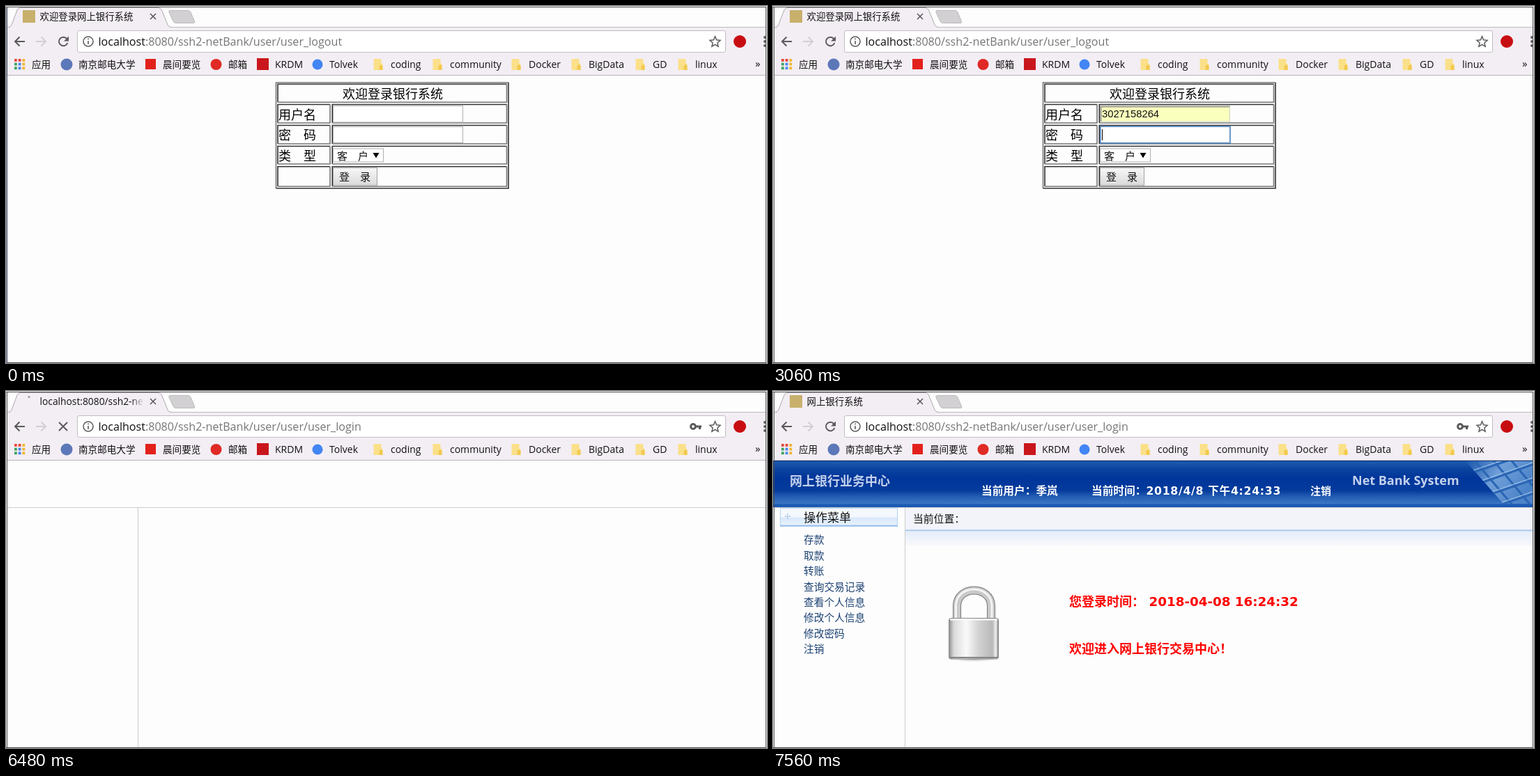
Animation, 1092 px wide and 513 px high, one loop 8000 ms. Source, as an HTML page:

```html
<!DOCTYPE html>
<html lang="zh-CN">
<head>
<meta charset="utf-8">
<title>网上银行系统</title>
<style>
  html, body { margin: 0; width: 100%; height: 100%; overflow: hidden; background: #fdfdfd; }
  svg { display: block; width: 100vw; height: 100vh; }
  text { font-family: "Open Sans", "Noto Sans CJK SC", "Noto Sans CJK", sans-serif; fill: #111; white-space: pre; }
  .tab { font-size: 13.4px; }
  .url { font-size: 16.1px; fill: #757575; }
  .url tspan { fill: #111; }
  .mark { font-size: 13.6px; }
  .cell { font-size: 18px; fill: #000; }
  .field { font: 14.75px "Liberation Sans", sans-serif; }
  .control { font-size: 15px; }
  .option { font-size: 14.5px; font-weight: 700; }
  .menu { font-size: 14.7px; fill: #1c4272; }
  .notice { font: 700 18px "DejaVu Sans", "Noto Sans CJK SC", "Noto Sans CJK", sans-serif; fill: #f00; }
  .bar { font: 700 15.7px "DejaVu Sans", "Noto Sans CJK SC", "Noto Sans CJK", sans-serif; fill: #fff; }
  .brand { font-weight: 700; font-size: 18px; fill: #c3d2ec; }
  .line { fill: none; stroke: #5a5a5a; stroke-width: 2; }
  .input { fill: #fff; stroke: #b0b0b0; }
  .focus { fill: none; stroke: #4a82c4; stroke-width: 1.5; }
  .caret { stroke: #000; stroke-width: 1; }
</style>
</head>
<body>
<svg viewBox="0 0 1092 513" preserveAspectRatio="none">
  <defs>
    <linearGradient id="button" x2="0" y2="1"><stop stop-color="#f7f7f7"/><stop offset="1" stop-color="#d9d9d9"/></linearGradient>
    <linearGradient id="header" x2="0" y2="1">
      <stop stop-color="#073a83"/><stop offset=".04" stop-color="#1d58ae"/><stop offset=".18" stop-color="#0c459f"/>
      <stop offset=".4" stop-color="#00359a"/><stop offset=".68" stop-color="#043b9c"/>
      <stop offset=".82" stop-color="#235db3"/><stop offset="1" stop-color="#3c78c4"/>
    </linearGradient>
    <linearGradient id="keys" x2="1" y2=".4"><stop stop-color="#1a55ad"/><stop offset=".5" stop-color="#6f9fd8"/><stop offset="1" stop-color="#4c83c8"/></linearGradient>
    <linearGradient id="menuHead" x2="0" y2="1"><stop stop-color="#f4f9ff"/><stop offset=".45" stop-color="#f5f9fe"/><stop offset=".55" stop-color="#d9e8fa"/><stop offset="1" stop-color="#e9f3fd"/></linearGradient>
    <linearGradient id="below" x2="0" y2="1"><stop stop-color="#e4ecf9"/><stop offset="1" stop-color="#f8f9fd"/></linearGradient>
    <linearGradient id="metal"><stop stop-color="#8e8e8e"/><stop offset=".1" stop-color="#dadada"/><stop offset=".35" stop-color="#fafafa"/><stop offset=".6" stop-color="#d2d2d2"/><stop offset=".88" stop-color="#b9b9b9"/><stop offset=".95" stop-color="#f2f2f2"/><stop offset="1" stop-color="#777"/></linearGradient>
    <radialGradient id="shade"><stop stop-color="#666"/><stop offset="1" stop-color="#fdfdfd" stop-opacity="0"/></radialGradient>
    <linearGradient id="fade"><stop stop-color="#f3eef4" stop-opacity="0"/><stop offset="1" stop-color="#f3eef4"/></linearGradient>
    <clipPath id="tabClip"><rect x="45" y="4" width="152" height="25"/></clipPath>
    <clipPath id="keysClip"><path d="M994 101H1090V162H1048Z"/></clipPath>
  </defs>
  <rect width="1092" height="513" fill="#fdfdfd"/>

  <!-- login page -->
  <g data-on="0-6480">
    <g id="cells"></g>
    <text class="cell" x="483" y="133">欢迎登录银行系统</text>
    <text class="cell" x="391" y="162.5">用户名</text>
    <text class="cell" x="391" y="192">密　码</text>
    <text class="cell" x="391" y="222">类　型</text>
    <rect class="input" x="469.5" y="143.5" width="186" height="23.5"/>
    <rect class="input" x="469.5" y="173.5" width="186" height="23"/>
    <rect class="input" x="469.5" y="205" width="72" height="19"/>
    <text class="control" x="475" y="220.5">客　户</text>
    <path d="M526.5 211H535.5L531 218.5Z"/>
    <rect x="469.5" y="232.5" width="63" height="25.5" fill="url(#button)" stroke="#a3a3a3"/>
    <text class="control" x="478" y="251">登　录</text>

    <g data-on="1980-6480">
      <rect x="470" y="144" width="185.5" height="22.5" fill="#faffbd"/>
      <path d="M470.8 166V145H655" fill="none" stroke="#a2a296" stroke-width="1.6"/>
      <path d="M471 166H655V145" fill="none" stroke="#dcdcd4"/>
      <text class="field" x="472" y="160">3027158264</text>
    </g>
    <rect class="focus" data-on="1320-3060" x="469.8" y="143" width="186.2" height="24"/>
    <path class="caret" data-on="1320-1800" d="M472.5 147V164"/>
    <path class="caret" data-on="2580-3060" d="M555.5 147V164"/>
    <g data-on="1560-2460">
      <rect x="470.5" y="167.5" width="186" height="55" fill="#fff" stroke="#a0a0a0"/>
      <rect data-on="1920-2460" x="471" y="168" width="186" height="27" fill="#bddcf5"/>
      <text class="option" x="479" y="186.5">3027158264</text>
      <text class="option" x="479" y="213.5" style="font-size:14px">owner</text>
    </g>

    <rect class="focus" data-on="3060-6480" x="469.8" y="173" width="186.2" height="24"/>
    <g id="dots"></g>
    <path id="passwordCaret" class="caret" data-on="3060-3600 3960-5580 6120-6480" d="M472.5 177V193"/>
  </g>

  <!-- bank page -->
  <g data-on="6480-8000">
    <path d="M2 167.5H1090M189.5 167V512" stroke="#ccc"/>
    <g data-on="6600-8000">
      <rect x="10.5" y="168.5" width="168" height="26" fill="url(#menuHead)" stroke="#b5d3f2"/>
      <path d="M10 193.5H179" stroke="#8fb9ea" stroke-width="1.6"/>
      <path d="M17 180H25M21 176V184" stroke="#7d9fc8" stroke-dasharray="2 1"/>
      <text x="44" y="188" style="font-size:17px">操作菜单</text>
      <g id="menu"></g>
    </g>
    <g data-on="6780-8000">
      <rect x="190" y="168" width="900" height="32" fill="#f2f4fa"/>
      <rect x="190" y="201" width="900" height="21" fill="url(#below)"/>
    </g>
    <g data-on="6660-8000">
      <path d="M190 200.2H1090" stroke="#abcbed" stroke-width="2"/>
      <text x="201" y="189.3" style="font-size:14.8px">当前位置：</text>
      <ellipse cx="288" cy="384" rx="43" ry="6" fill="url(#shade)"/>
      <path d="M264 328V309C264 279 313 279 313 309V328" fill="none" stroke="#777" stroke-width="12"/>
      <path d="M264 328V309C264 279 313 279 313 309V328" fill="none" stroke="#c9c9c9" stroke-width="10"/>
      <path d="M262.5 328V309C262.5 277 314 277 314 309V328" fill="none" stroke="#f3f3f3" stroke-width="3"/>
      <rect x="252.5" y="326.5" width="71" height="58.5" rx="3" fill="url(#metal)" stroke="#8b8b8b"/>
      <path d="M254 328.5H322" stroke="#fff" stroke-width="2"/>
      <path d="M254 383H322" stroke="#858585" stroke-width="2"/>
      <text class="notice" x="425" y="309">您登录时间：</text>
      <text class="notice" x="539.5" y="308.5" style="font-size:18.3px">2018-04-08 16:24:32</text>
      <text class="notice" x="425" y="377">欢迎进入网上银行交易中心！</text>
    </g>
    <g data-on="6780-8000">
      <rect y="100" width="1090" height="63" fill="url(#header)"/>
      <g clip-path="url(#keysClip)">
        <rect x="994" y="101" width="97" height="62" fill="url(#keys)"/>
        <path d="M990 122L1090 88M1005 136L1095 104M1025 150L1095 126M1040 165L1095 146M1005 98L1062 165M1032 98L1088 165M1058 98L1110 160" stroke="#2b66b5" stroke-width="3"/>
        <path d="M990 119L1090 85M1005 133L1095 101M1025 147L1095 123M1040 162L1095 143" stroke="#a8c8ec"/>
      </g>
      <text class="brand" x="24" y="135.5">网上银行业务中心</text>
      <text class="brand" x="831" y="134.5">Net Bank System</text>
      <g data-on="6780-7560">
        <text class="bar" x="395" y="149">当前用户：季岚</text>
        <text class="bar" x="553" y="149">当前时间：</text>
        <text class="bar" x="675" y="149" style="font-size:15px">注销</text>
      </g>
      <g data-on="7560-8000">
        <text class="bar" x="299" y="149">当前用户：季岚</text>
        <text class="bar" x="457" y="149">当前时间：</text>
        <text class="bar" x="535.5" y="148.5" style="letter-spacing:.7px">2018/4/8 下午4:24:33</text>
        <text class="bar" x="771" y="149" style="font-size:15px">注销</text>
      </g>
    </g>
    <rect data-on="6660-8000" y="162.5" width="1090" height="4.5" fill="#1a5ab3"/>
  </g>

  <!-- browser window -->
  <rect x="1" y="30" width="1090" height="69" fill="#f3eef4"/>
  <path d="M1 99.5H1091" stroke="#b8b5b9"/>
  <path d="M1 30.5H5M236 30.5H1091" stroke="#bdbabe"/>
  <path d="M4 31Q7 30 8 27L16 6Q17.5 2.5 21 2.5H218Q222 2.5 223.5 6L232 27Q233 30 237 31Z" fill="#f3eef4"/>
  <path d="M4 30.5Q7 30 8 27L16 6Q17.5 2.5 21 2.5H218Q222 2.5 223.5 6L232 27Q233 30 237 30.5" fill="none" stroke="#aaa7ab"/>
  <path d="M235.5 6.5H261Q264 6.5 265 9L270.5 22Q271.5 24.5 269 24.5H244Q241 24.5 240 22L234 9Q233 6.5 235.5 6.5Z" fill="#d2d0d2" stroke="#bbb9bb"/>
  <path d="M207 11L215 19M215 11L207 19" stroke="#555" stroke-width="1.5"/>

  <rect data-on="0-6420 6840-8000" x="24" y="6" width="18" height="18" fill="#c8b06c"/>
  <circle data-on="6420-6600" cx="33" cy="8.5" r="1.5" fill="#999"/>
  <path id="spinner" data-on="6600-6840" d="M39.5 11.5A7 7 0 1 1 26 15" fill="none" stroke="#4a7fd6" stroke-width="2"/>
  <text class="tab" data-on="0-6420" x="48.5" y="20">欢迎登录网上银行系统</text>
  <g data-on="6420-6600">
    <text class="tab" x="48.5" y="19.5" clip-path="url(#tabClip)" style="font-size:13.8px">localhost:8080/ssh2-netBank</text>
    <rect x="180" y="5" width="18" height="22" fill="url(#fade)"/>
  </g>
  <text class="tab" data-on="6600-8000" x="48.5" y="20">网上银行系统</text>

  <path class="line" d="M27 51H13M19.5 44.5L13 51L19.5 57.5"/>
  <path class="line" d="M43 51H57M50.5 44.5L57 51L50.5 57.5" style="stroke:#d2ced3"/>
  <g data-on="0-6420 6840-8000">
    <path class="line" d="M87.2 47A6.3 6.3 0 1 0 88.3 53"/>
    <path d="M90 43.5V50.5H83Z" fill="#5a5a5a"/>
  </g>
  <path class="line" data-on="6420-6840" d="M76 45L88 57M88 45L76 57"/>
  <rect x="102.5" y="35.5" width="930" height="31" rx="2.5" fill="#fff" stroke="#c0bdc1"/>
  <circle class="line" cx="118" cy="51" r="7" style="stroke-width:1.5"/>
  <path class="line" d="M118 50V55M118 46.5V48.3" style="stroke-width:1.6"/>
  <text class="url" data-on="0-6420" x="132.5" y="56.5"><tspan>localhost</tspan>:8080/ssh2-netBank/user/user_logout</text>
  <text class="url" data-on="6420-8000" x="132.5" y="56.5"><tspan>localhost</tspan>:8080/ssh2-netBank/user/user/user_login</text>
  <g data-on="3960-8000">
    <circle class="line" cx="986" cy="51" r="3.4" style="stroke-width:3"/>
    <path class="line" d="M990 51H998M995.5 51V55" style="stroke-width:3"/>
  </g>
  <path class="line" d="M1017.5 43.8L1019.6 48.8L1025 49.3L1020.9 52.9L1022.1 58.2L1017.5 55.4L1012.9 58.2L1014.1 52.9L1010 49.3L1015.4 48.8Z" style="stroke-width:1.5"/>
  <circle cx="1053" cy="51" r="9" fill="#c80d12"/>
  <g fill="#5a5a5a"><circle cx="1089" cy="45" r="2"/><circle cx="1089" cy="51" r="2"/><circle cx="1089" cy="57" r="2"/></g>

  <g id="apps"></g>
  <circle cx="87" cy="84" r="8.5" fill="#5c78b8"/>
  <rect x="200" y="76" width="15" height="15" fill="#e3211c"/>
  <circle cx="301.5" cy="84" r="8" fill="#e02a25"/>
  <rect x="360" y="75" width="17" height="17" fill="#c9161c"/>
  <circle cx="447" cy="84" r="7.5" fill="#4285f4"/>
  <g id="marks"></g>
  <text class="mark" x="1075" y="87.5" style="font-size:15px">»</text>

  <path d="M0 1.5H1091M1090.5 1V513M0 512.5H1091" stroke="#4a4a4a" fill="none"/>
  <path d="M1.5 1V513" stroke="#4a4a4a"/>
  <path data-on="0-1320" d="M.5 0V513" stroke="#9fb6d6"/>
</svg>
<script>
  const LOOP = 8000;
  const byId = id => document.getElementById(id);
  const fill = (id, parts) => { byId(id).innerHTML = parts.join(''); };

  const bevel = (x, y, w, h, topLeft, bottomRight) =>
    `<g fill="none" stroke-width="1.6"><path d="M${x} ${y + h}V${y}H${x + w}" stroke="${topLeft}"/>` +
    `<path d="M${x} ${y + h}H${x + w}V${y}" stroke="${bottomRight}"/></g>`;
  const cell = (x, y, w, h) => bevel(x, y, w, h, '#333', '#777');
  const rows = [[141.5, 26.5], [171.5, 26.5], [201.5, 25.5], [230.8, 28.5]];
  fill('cells', [
    bevel(387.5, 110, 333.5, 152, '#777', '#333'),
    cell(390, 112.2, 328.5, 26),
    ...rows.map(([y, h]) => cell(390, y, 75, h) + cell(468.3, y, 250.2, h))
  ]);

  const keyTimes = [3960, 4140, 4380, 4680, 4920, 5100];
  const PITCH = 5.2;
  fill('dots', keyTimes.map((t, i) =>
    `<circle data-on="${t}-6480" cx="${474.7 + i * PITCH}" cy="184" r="2"/>`));

  const menu = ['存款', '取款', '转账', '查询交易记录', '查看个人信息', '修改个人信息', '修改密码', '注销'];
  fill('menu', menu.map((label, i) => `<text class="menu" x="44" y="${219.3 + i * 22.4}">${label}</text>`));

  const appColors = ['#e8483b', '#e8483b', '#f2b62f', '#3ba55c', '#4a86e8', '#f2b62f', '#3ba55c', '#4a86e8', '#f2b62f'];
  fill('apps', appColors.map((c, i) =>
    `<rect x="${12 + i % 3 * 5.7}" y="${76 + Math.floor(i / 3) * 5.7}" width="3.8" height="3.8" fill="${c}"/>`));

  const folder = x => `<path d="M${x} 76H${x + 11}V82L${x + 13} 84V92H${x}Z" fill="#fbe08a"/>` +
    `<path d="M${x + 8} 92V86L${x + 11} 84L${x + 13} 86V92Z" fill="#f2c94f"/>`;
  const marks = [[37, '应用'], [104, '南京邮电大学'], [225, '晨间要览'], [319, '邮箱'], [386, 'KRDM'], [464, 'Tolvek']];
  const folders = [[552, 'coding'], [637, 'community'], [750, 'Docker'], [836, 'BigData'], [928, 'GD'], [989, 'linux']];
  fill('marks', [
    ...folders.map(([x]) => folder(x - 24.5)),
    ...[...marks, ...folders].map(([x, label]) => {
      const latin = /^\w/.test(label);
      return `<text class="mark" x="${x}" y="${latin ? 88.7 : 89}"${latin ? ' style="font-size:14px"' : ''}>${label}</text>`;
    })
  ]);

  const timed = [...document.querySelectorAll('[data-on]')].map(el => ({
    el, spans: el.dataset.on.split(' ').map(span => span.split('-').map(Number))
  }));

  function draw(t) {
    for (const { el, spans } of timed)
      el.style.display = spans.some(([from, to]) => t >= from && t < to) ? '' : 'none';
    const typed = keyTimes.filter(k => t >= k).length;
    byId('passwordCaret').setAttribute('transform', `translate(${Math.round(typed * PITCH)})`);
    const angle = Math.floor((t - 6720) / 60) * 30;
    byId('spinner').setAttribute('transform', `rotate(${angle} 33 15)`);
  }

  const start = performance.now();
  function tick() {
    draw((performance.now() - start) % LOOP);
    requestAnimationFrame(tick);
  }
  tick();
</script>
</body>
</html>
```
